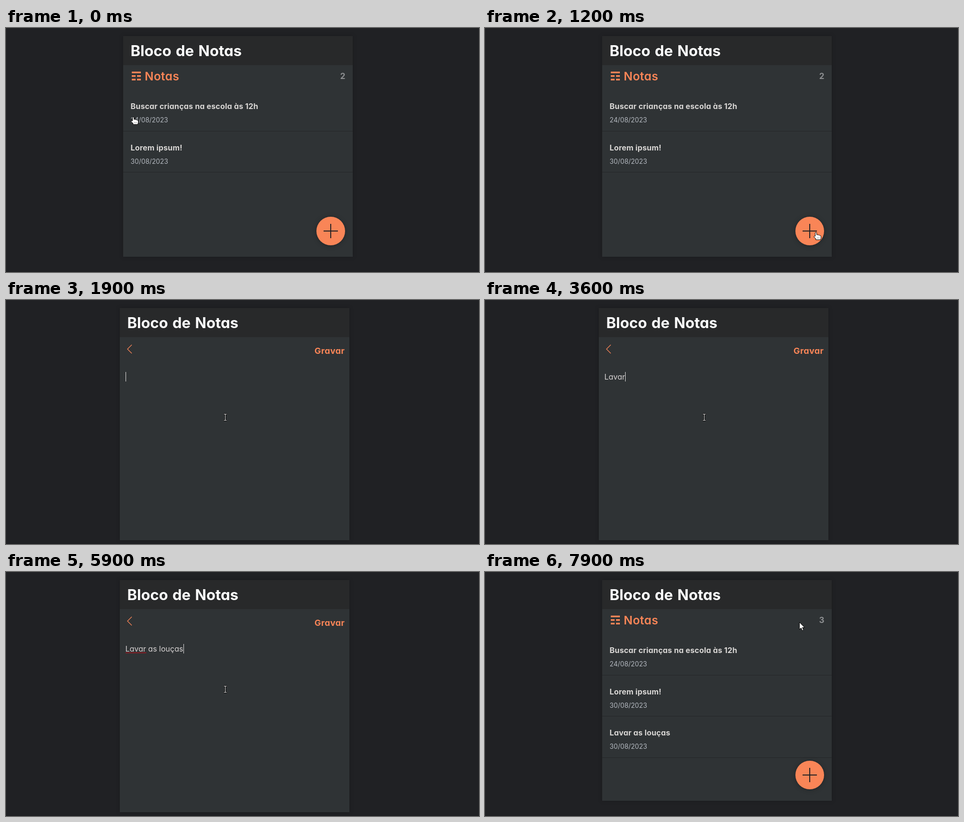
Animation, 989 px wide and 512 px high, one loop 8 s. Source, as an HTML page:

```html
<!DOCTYPE html>
<html lang="pt">
<head>
<meta charset="utf-8">
<title>Bloco de Notas</title>
<style>
  html, body { margin: 0; width: 100%; height: 100%; overflow: hidden; background: #202124; }
  svg { display: block; width: 989px; height: 512px; }
  text { font-family: Inter, "Open Sans", sans-serif; font-feature-settings: "cv11"; white-space: pre; }
  .title { font-size: 31px; font-weight: 700; letter-spacing: 0; word-spacing: 2px; fill: #fcfdfd; }
  .heading { font-size: 24.5px; font-weight: 600; letter-spacing: .3px; }
  .accent { fill: #f98557; }
  .count { font-size: 17px; font-weight: 700; fill: #8d8f91; text-anchor: end; }
  .note { font-size: 16px; font-weight: 700; letter-spacing: .17px; fill: #d9d7d5; }
  .date { font-size: 13.8px; fill: #b3b8bf; }
  .save { font-size: 18px; font-weight: 700; letter-spacing: .4px; }
  .typed { font-size: 16px; fill: #d8d4d4; }
  .panel { filter: drop-shadow(0 0 4px rgba(0, 0, 0, .2)); }
  .fab { filter: drop-shadow(0 1px 5px rgba(0, 0, 0, .3)); }
  .cursor { fill: #fff; stroke: #000; stroke-linejoin: round; }
</style>
</head>
<body>
<svg viewBox="0 0 989 512">
  <rect width="989" height="512" fill="#202124"/>
  <rect y="510" width="989" height="2" fill="#1d1e21"/>

  <g id="frame">
    <g class="panel">
      <rect id="body" x="245" y="17" width="480" height="463" fill="#2f3335"/>
      <rect x="245" y="17" width="480" height="61" fill="#28292a"/>
    </g>
    <text class="title" x="260.5" y="58.5">Bloco de Notas</text>
  </g>

  <g id="list">
    <path class="accent" d="M263 91.5h19v3.5h-19zM263 99h8v3.5h-8zM274 99h8v3.5h-8zM263 106.5h8v3.5h-8zM274 106.5h8v3.5h-8z"/>
    <text class="heading accent" x="290" y="110">Notas</text>
    <text class="count" id="count" x="709.5" y="107"></text>
    <g id="notes"></g>
    <circle class="fab accent" cx="679" cy="426" r="30"/>
    <path d="M664 426h30M679 411v30" stroke="#202124" stroke-width="2"/>
  </g>

  <g id="editor">
    <path d="M263 94l-9 9 9 9" fill="none" stroke="#f98557" stroke-width="1.3"/>
    <text class="save accent" x="645" y="113">Gravar</text>
    <path id="spelling" stroke="#a8171f" stroke-width="1.5"/>
    <text class="typed" id="typed" x="249.5" y="167"></text>
    <rect id="caret" y="151" width="1" height="20" fill="#e4e1e1"/>
  </g>

  <path id="status" d="M0 490H252q4 0 4 4V512H0z" fill="#69a06b" fill-opacity=".95"/>

  <g id="pointer">
    <g id="hand" class="cursor" transform="translate(0 -4)">
      <path d="M3.5 9V2.2Q3.5.6 5 .6T6.5 2.2V5.8Q8 5 9 6.2 10.4 5.6 11.6 6.8 13 6.3 13.8 7.6 15.5 7.4 15.5 9.3V13.2L14.3 16.3H4.6V13.8L1 10.9Q.3 9.2 1.8 8.7 2.8 8.4 3.5 9z"/>
      <path d="M7.6 11.5v2M9.8 11.5v2M12 11.5v2" stroke-width=".5"/>
    </g>
    <path id="arrow" class="cursor" d="M.5.5V15.5L4 12.3 6.3 18 8.9 16.9 6.6 11.5H11.2z"/>
    <g id="beam" fill="none">
      <path d="M-3 -6.5H4M.5 -6.5V6.5M-3 6.5H4" stroke="#000" stroke-width="3"/>
      <path d="M-2.5 -6.5H3.5M.5 -6.5V6.5M-2.5 6.5H3.5" stroke="#fff"/>
    </g>
  </g>
</svg>
<script>
const LOOP = 8000, STEP = 100;
const OPEN = 1300, SAVE = 7500, BLUR = 7400;
const ROW = 86.5;
const PHRASE = "Lavar as louças";
const KEYS = [2900, 3100, 3400, 3500, 3600, 3700, 3900, 4100, 4200, 4700, 4900, 5100, 5600, 5700, 5900];
const CARET = [[1900, 2600], [2900, 6500], [7100, BLUR]];

// Hotspot waypoints: time, x, y
const PATH = [
  [0, 261, 190], [100, 274, 199], [300, 390, 262], [500, 575, 370], [700, 700, 441],
  [800, 696, 439], [900, 696, 439], [1200, 687, 432], [1300, 681, 427], [1400, 681, 427],
  [1500, 605, 378], [1600, 523, 326], [1700, 483, 279], [1800, 463, 253], [1900, 458, 246],
  [6600, 458, 246], [6900, 530, 192], [7100, 618, 136], [7300, 655, 108], [7400, 657, 105]
];
const SHAPES = [[0, "hand"], [500, "arrow"], [700, "hand"], [1500, "beam"], [7200, "arrow"], [7300, "hand"], [7900, "arrow"]];

const $ = id => document.getElementById(id);
const show = (id, on) => $(id).setAttribute("display", on ? "inline" : "none");
const within = (t, a, b) => t >= a && t < b;

function noteRow(title, date, i) {
  const textY = Math.round(i * ROW), lineY = Math.floor(i * ROW);
  return `<g><text class="note" x="260.5" y="${170 + textY}">${title}</text>
    <text class="date" x="260.5" y="${198 + textY}">${date}</text>
    <rect x="245" y="${216 + lineY}" width="480" height="1" fill="#242628"/></g>`;
}

$("notes").innerHTML = [
  ["Buscar crianças na escola às 12h", "24/08/2023"],
  ["Lorem ipsum!", "30/08/2023"],
  [PHRASE, "30/08/2023"]
].map(([title, date], i) => noteRow(title, date, i)).join("");

function position(t) {
  const i = PATH.findIndex(p => p[0] > t);
  if (i < 0) return PATH[PATH.length - 1].slice(1);
  const [t0, x0, y0] = PATH[i - 1], [t1, x1, y1] = PATH[i];
  const k = (t - t0) / (t1 - t0);
  return [x0 + (x1 - x0) * k, y0 + (y1 - y0) * k].map(Math.round);
}

function drawEditor(t) {
  const typed = $("typed");
  const n = KEYS.filter(k => k <= t).length;
  typed.textContent = PHRASE.slice(0, n);
  const width = count => count ? typed.getSubStringLength(0, count) : 0;
  $("caret").setAttribute("x", Math.round(250 + width(n)));
  show("caret", CARET.some(([a, b]) => within(t, a, b)));

  let line = "";
  if (t >= 3800) line += `M250 169.5H${250 + width(5)}`;
  if (t >= BLUR) line += `M${250 + width(9)} 169.5H${250 + width(15)}`;
  $("spelling").setAttribute("d", line);
}

function draw(ms) {
  const t = Math.floor(ms % LOOP / STEP) * STEP;
  const editing = within(t, OPEN, SAVE);
  const saved = t >= SAVE;

  $("frame").setAttribute("transform", `translate(${editing ? -7 : 0} 0)`);
  $("body").setAttribute("height", editing ? 487 : 463);
  show("list", !editing);
  show("editor", editing);
  show("status", within(t, OPEN, 1700));
  $("count").textContent = saved ? 3 : 2;
  $("notes").lastElementChild.setAttribute("display", saved ? "inline" : "none");
  if (editing) drawEditor(t);

  const shape = SHAPES.filter(s => s[0] <= t).pop()[1];
  for (const id of ["hand", "arrow", "beam"]) show(id, id === shape);
  $("pointer").setAttribute("transform", `translate(${position(t)})`);
}

let start;
function tick(now) {
  start ??= now;
  draw(now - start);
  requestAnimationFrame(tick);
}
draw(0);
requestAnimationFrame(tick);
</script>
</body>
</html>
```
